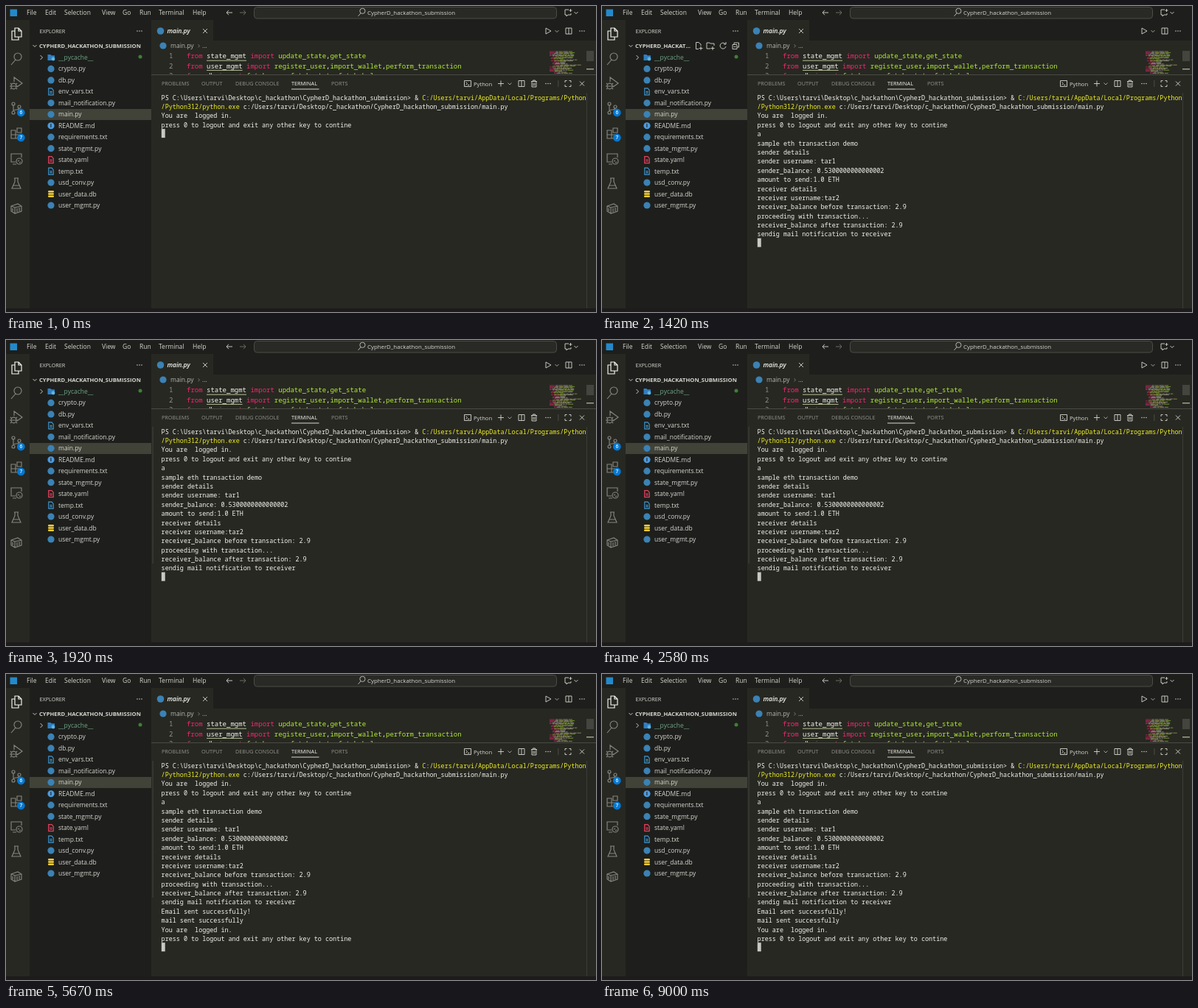
These frames come from a looping animation (800 by 416 pixels, 9.5 s). An HTML page:

```html
<!DOCTYPE html>
<html lang="en">
<head>
<meta charset="utf-8">
<title>Editor terminal</title>
<style>
  html, body { margin: 0; width: 100%; height: 100%; overflow: hidden; background: #272822; }
  svg { display: block; width: 800px; height: 416px; }
  text { white-space: pre; font-family: "Open Sans", "Noto Sans", sans-serif; }
  .mono { font-family: "Noto Sans Mono", "DejaVu Sans Mono", monospace; font-weight: 500; }
</style>
</head>
<body>
<svg id="stage" viewBox="0 0 800 416"></svg>
<script>
const LOOP = 9500;
const BG = '#272822', DARK = '#1e1f1c', FG = '#d6d6d0', GREY = '#92938c', BLUE = '#3b82b5';
const WHITE = '#f4f4ee', PINK = '#f92672', GREEN = '#b0ec32', YELLOW = '#f0f022';
const ROW = 15.46, LINE = 12.38;

const esc = s => s.replace(/&/g, '&amp;').replace(/</g, '&lt;').replace(/>/g, '&gt;');
const rect = (x, y, w, h, fill, extra = '') =>
  `<rect x="${x}" y="${y}" width="${w}" height="${h}" fill="${fill}" ${extra}/>`;
const dot = (x, y, r, fill) => `<circle cx="${x}" cy="${y}" r="${r}" fill="${fill}"/>`;
const text = (x, y, s, size = 8.5, fill = FG, extra = '') =>
  `<text x="${x}" y="${y}" font-size="${size}" fill="${fill}" ${extra}>${esc(s)}</text>`;
// Parts are [string, colour] pairs set in one run of monospace text.
const code = (x, y, size, parts, extra = '') =>
  `<text class="mono" x="${x}" y="${y}" font-size="${size}" ${extra}>` +
  parts.map(([s, c]) => `<tspan fill="${c}">${esc(s)}</tspan>`).join('') + '</text>';
// Stroked icon; the path is drawn around its centre.
const icon = (x, y, d, color = FG, width = 0.9) =>
  `<path transform="translate(${x} ${y})" d="${d}" fill="none" stroke="${color}" stroke-width="${width}"/>`;
const group = (id, body) => `<g id="${id}" visibility="hidden">${body}</g>`;

const CROSS = 'M-3-3L3 3M3-3L-3 3';
const CHEVRON = 'M-2.5-1L0 1.5L2.5-1';
const CHEVRON_RIGHT = 'M-1.5-3L1.5 0L-1.5 3';
const SPLIT = 'M-4-4H4V4H-4ZM0-4V4';
const LENS = 'M-4.5 5L-1 1M5-2A3.6 3.6 0 1 1-2.2-2A3.6 3.6 0 1 1 5-2';
const dots = (x, y) => [-3, 0, 3].map(d => dot(x + d, y, 0.75, FG)).join('');

function titleBar() {
  const menu = [['File', 28], ['Edit', 53], ['Selection', 79], ['View', 130], ['Go', 158],
                ['Run', 181], ['Terminal', 207], ['Help', 253]];
  return rect(0, 0, 800, 19, DARK) + rect(5.5, 4.5, 9.5, 9.5, '#2489ca') +
    menu.map(([s, x]) => text(x, 12.3, s)).join('') +
    icon(303, 9, 'M4 0H-4M-1-3.2L-4 0L-1 3.2') +
    icon(321, 9, 'M-4 0H4M1-3.2L4 0L1 3.2', '#73746d') +
    rect(336.5, 1.5, 410, 15.5, '#292a26', 'rx="4" stroke="#4b4c46"') +
    icon(482, 8.8, LENS, FG, 0.8) + text(490, 12, 'CypherD_hackathon_submission', 7.85) +
    icon(762, 9, 'M1-4H-4V3H-2V5L0 3H4V1M3.5-5V-1M1.5-3H5.5') + icon(773, 9, CHEVRON);
}

function activityBar() {
  const badge = (y, n) => dot(20.3, y, 5.4, '#0078d4') +
    text(20.3, y + 2.4, n, 6.5, '#fff', 'text-anchor="middle" font-weight="600"');
  const icons = [
    [38, 'M-2-8H3L7-4V4H-2ZM3-8V-4H7M-2-4H-6V8H3V4', '#f8f8f2'],
    [72, 'M-7 8L-1 1M7-3A5 5 0 1 1-3-3A5 5 0 1 1 7-3'],
    [105, 'M-3-2V-8L8 0L1 5M-7 4A3.2 3.5 0 1 1 0 4A3.2 3.5 0 1 1-7 4M-8 0L-6 2M1 0L-1 2M-9 4H2M-8 8L-6 6M1 8L-1 6'],
    [139, 'M-2-6A2 2 0 1 1-6-6A2 2 0 1 1-2-6M6-2A2 2 0 1 1 2-2A2 2 0 1 1 6-2M-2 6A2 2 0 1 1-6 6A2 2 0 1 1-2 6M-4-4V4M4 0C4 3-4 1-4 4'],
    [173, 'M-7-4H-1V7H-7ZM-7 2H5V7H-1M1-7H7V-1H1Z'],
    [207, 'M-1 5H-7V-6H7V-1M-5 8H0M8 4A4 4 0 1 1 0 4A4 4 0 1 1 8 4M2 4L4 3M6 5L4 6'],
    [241, 'M-3-7H3M-2-7V-2L-6 7H6L2-2V-7M-4 3H4'],
    [275, 'M-7-3L2-6L7-3V4L-2 7L-7 4ZM-7-3L-2-1L7-3M-2-1V7M1 0V5M4-1V4M-5 0V4']];
  return rect(0, 19, 32, 392, BG) +
    icons.map(([y, d, c = '#85867f']) => icon(14, y, d, c, 1.15)).join('') +
    badge(145, '6') + badge(179, '7');
}

const fileIcons = {
  py: y => dot(61, y, 4.6, BLUE),
  txt: y => icon(61, y, 'M-3.2-4.5H1L3.2-2V4.5H-3.2ZM-1.5 0H1.5M-1.5 2H1.5', '#3f9bd6', 1.1),
  md: y => dot(61, y, 4.6, '#4a9be0') + text(61, y + 2.6, 'i', 7.5, DARK, 'text-anchor="middle" font-weight="700"'),
  yaml: y => icon(61, y, 'M-3.2-4.5H1L3.2-2V4.5H-3.2ZM-1.5 0H1.5M-1.5 2H1.5', '#e5405e', 1.3),
  db: y => [-3.2, 0, 3.2].map(d => rect(57, y + d - 1.3, 8, 2.5, '#f5cf38', 'rx="1.2"')).join('')
};

function sidebar() {
  const files = ['crypto.py', 'db.py', 'env_vars.txt', 'mail_notification.py', 'main.py', 'README.md',
    'requirements.txt', 'state_mgmt.py', 'state.yaml', 'temp.txt', 'usd_conv.py', 'user_data.db', 'user_mgmt.py'];
  const rowY = i => 70 + i * ROW;
  const rowBar = (i, fill) => rect(32, Math.round(rowY(i) - ROW / 2), 165, 15, fill);
  const folder = s => text(45, 56.6, s, 7.65, FG, 'font-weight="700"');
  return rect(32, 19, 165, 392, DARK) + text(45.5, 36.6, 'EXPLORER', 7.25) + dots(181, 34) +
    icon(39, 54, CHEVRON) +
    `<g id="folder">${folder('CYPHERD_HACKATHON_SUBMISSION')}</g>` +
    group('toolbar', folder('CYPHERD_HACKAT…') +
      icon(131, 54, 'M0 4.5H-3.5V-4.5H0L3-2V0M3 1V6M.5 3.5H5.5') +
      icon(147, 54, 'M0 4H-5V-4H-1L0-3H5V0M3 1V6M.5 3.5H5.5') +
      icon(164, 54, 'M3.5-2A4 4 0 1 0 4 1M4-5V-2H1') +
      icon(181, 54, 'M-4-1.5H2V4.5H-4ZM-2-1.5V-4H4.5V2H2M-2.5 1.5H.5')) +
    rowBar(5, '#414339') + group('hoverRow', rowBar(7, '#3a3b33')) +
    icon(48, 70, CHEVRON_RIGHT) +
    '<path d="M56.5 66h4l1 1.3h4.5v6.7h-9.5z" fill="#2f7fc2"/>' + dot(64, 72, 2.4, '#59b5e8') +
    text(71, 73, '__pycache__', 8.5, '#6fa287') + dot(182, 69, 2.5, '#3f7f35') +
    files.map((name, i) => {
      const y = rowY(i + 1);
      const kind = name === 'requirements.txt' ? 'py' : name.split('.')[1];
      return fileIcons[kind](y) + text(71, y + 3, name);
    }).join('');
}

function minimap() {
  let seed = 7, out = '';
  const rand = () => (seed = seed * 16807 % 2147483647) / 2147483647;
  for (let row = 0; row < 22; row++) {
    let x = 737 + (row < 5 ? 0 : Math.floor(rand() * 4) * 2);
    const end = x + (row < 5 ? 26 + rand() * 12 : 8 + rand() * 24);
    let color = PINK;
    while (x < end) {
      const w = 2 + rand() * 6;
      out += rect(x, 61.5 + row * 1.4, w, 0.9, color, 'opacity=".6"');
      x += w + 0.8;
      color = ['#d8d8c0', GREEN, '#d8cf62'][Math.floor(rand() * 3)];
    }
  }
  return out;
}

function editor() {
  const source = [['state_mgmt', 'update_state,get_state'],
    ['user_mgmt', 'register_user,import_wallet,perform_transaction'],
    ['db', 'fetch_user,fetch_state,fetch_balance']];
  const lines = source.map(([module, names], i) => {
    const y = 71.3 + i * 13.2;
    const parts = names.split(/(,)/).map(s => [s, s === ',' ? WHITE : GREEN]);
    return code(221, y, 9, [[String(i + 1), GREY]]) +
      code(245, y, 9, [['from ', PINK], [module, WHITE], [' import ', PINK], ...parts]) +
      (i < 2 ? rect(272, y + 2.4, module.length * 5.4, 0.9, '#c3d0a0') : '');
  }).join('');
  return rect(197, 19, 603, 28, DARK) + rect(197, 19, 84, 28, BG) +
    dot(209.5, 34, 4.8, BLUE) +
    text(218.5, 37, 'main.py', 8.5, '#f8f8f2', 'font-style="italic" font-weight="600"') + icon(270, 34, CROSS) +
    icon(735, 34, 'M-3-4L4 0L-3 4Z') + icon(747, 34, CHEVRON, FG, 0.7) +
    icon(763, 34, SPLIT) + dots(781, 34) +
    dot(213, 54, 4.6, BLUE) + text(223, 57, 'main.py', 8.5, '#b6b7b0') +
    icon(261.5, 54.3, 'M-1-2L1 0L-1 2', GREY, 0.8) + text(266, 57, '...', 8.5, '#b6b7b0') +
    `<g clip-path="url(#editorClip)">${lines}${minimap()}</g>` +
    rect(787, 61, 10, 14, '#44453f') + rect(787, 85, 10, 1.5, '#a0a08c');
}

function panelHeader() {
  const tabs = [['PROBLEMS', 211], ['OUTPUT', 265], ['DEBUG CONSOLE', 311], ['TERMINAL', 387], ['PORTS', 441]];
  return rect(197, 93, 603, 1, '#4a4b43') +
    tabs.map(([s, x]) => s === 'TERMINAL'
      ? text(x, 108.3, s, 7.25, '#f8f8f2', 'font-weight="500"')
      : text(x, 108.3, s, 7.25, GREY)).join('') +
    rect(387, 112.5, 37.5, 1, '#d8d8d0') +
    icon(626, 105.5, 'M-4.5-4H4.5V4H-4.5ZM-2.5-2L-.5 0L-2.5 2M0 2H2.5') + text(634, 108.5, 'Python', 7.65) +
    icon(671, 105.5, 'M-4 0H4M0-4V4') + icon(683, 105.5, CHEVRON, FG, 0.7) +
    icon(699, 105.5, SPLIT) +
    icon(716, 105.5, 'M-4-3H4M-3-3V4.5H3V-3M-1.5-3V-4.5H1.5V-3M-1-1V3M1-1V3') + dots(735, 105.5) +
    rect(748.5, 101, 0.8, 9, '#55564f') +
    icon(762, 105.5, 'M-4-1.5V-4H-1.5M1.5-4H4V-1.5M4 1.5V4H1.5M-1.5 4H-4V1.5') + icon(781, 105.5, CROSS);
}

const loggedIn = ['You are  logged in.', 'press 0 to logout and exit any other key to contine'];
const output = [
  [['PS C:\\Users\\tarvi\\Desktop\\c_hackathon\\CypherD_hackathon_submission> & ', WHITE],
   ['C:/Users/tarvi/AppData/Local/Programs/Python', YELLOW]],
  [['/Python312/python.exe', YELLOW], [' c:/Users/tarvi/Desktop/c_hackathon/CypherD_hackathon_submission/main.py', WHITE]],
  ...loggedIn, 'a', 'sample eth transaction demo',
  'sender details', 'sender username: tar1', 'sender_balance: 0.5300000000000002', 'amount to send:1.0 ETH',
  'receiver details', 'receiver username:tar2', 'receiver_balance before transaction: 2.9',
  'proceeding with transaction...', 'receiver_balance after transaction: 2.9',
  'sendig mail notification to receiver', 'Email sent successfully!', 'mail sent successfully', ...loggedIn];

const terminal = () => group('guide', rect(198.6, 118, 0.9, 186, '#45463f')) +
  output.map((line, i) => code(210.6, 127.7 + i * LINE, 8.44,
    Array.isArray(line) ? line : [[line, WHITE]], 'data-line')).join('') +
  rect(210.8, 0, 4.9, 12, '#c9c9c3', 'id="cursor"');

const stage = document.getElementById('stage');
stage.innerHTML = '<clipPath id="editorClip"><rect x="197" y="60" width="603" height="33"/></clipPath>' +
  rect(0, 0, 800, 416, BG) + titleBar() + activityBar() + sidebar() + editor() + panelHeader() + terminal() +
  rect(787, 118, 1, 293, '#3b3c36') + rect(0, 411, 800, 5, '#1d1b1b');

const lineNodes = [...stage.querySelectorAll('[data-line]')];
const byId = id => document.getElementById(id);
const show = (node, on) => node.setAttribute('visibility', on ? 'visible' : 'hidden');

// [start time in ms, printed lines]
const progress = [[0, 4], [80, 5], [170, 8], [500, 12], [580, 16], [5500, 17], [5670, 20]];

function draw() {
  const t = performance.now() % LOOP;
  const within = (from, to) => t >= from && t < to;
  const printed = progress.filter(([start]) => t >= start).pop()[1];
  lineNodes.forEach((node, i) => show(node, i < printed));
  byId('cursor').setAttribute('y', 117.6 + printed * LINE);
  const exploring = within(1420, 1750);
  show(byId('toolbar'), exploring);
  show(byId('folder'), !exploring);
  show(byId('hoverRow'), within(1500, 1670));
  show(byId('guide'), t >= 1830);
  requestAnimationFrame(draw);
}
draw();
</script>
</body>
</html>
```
